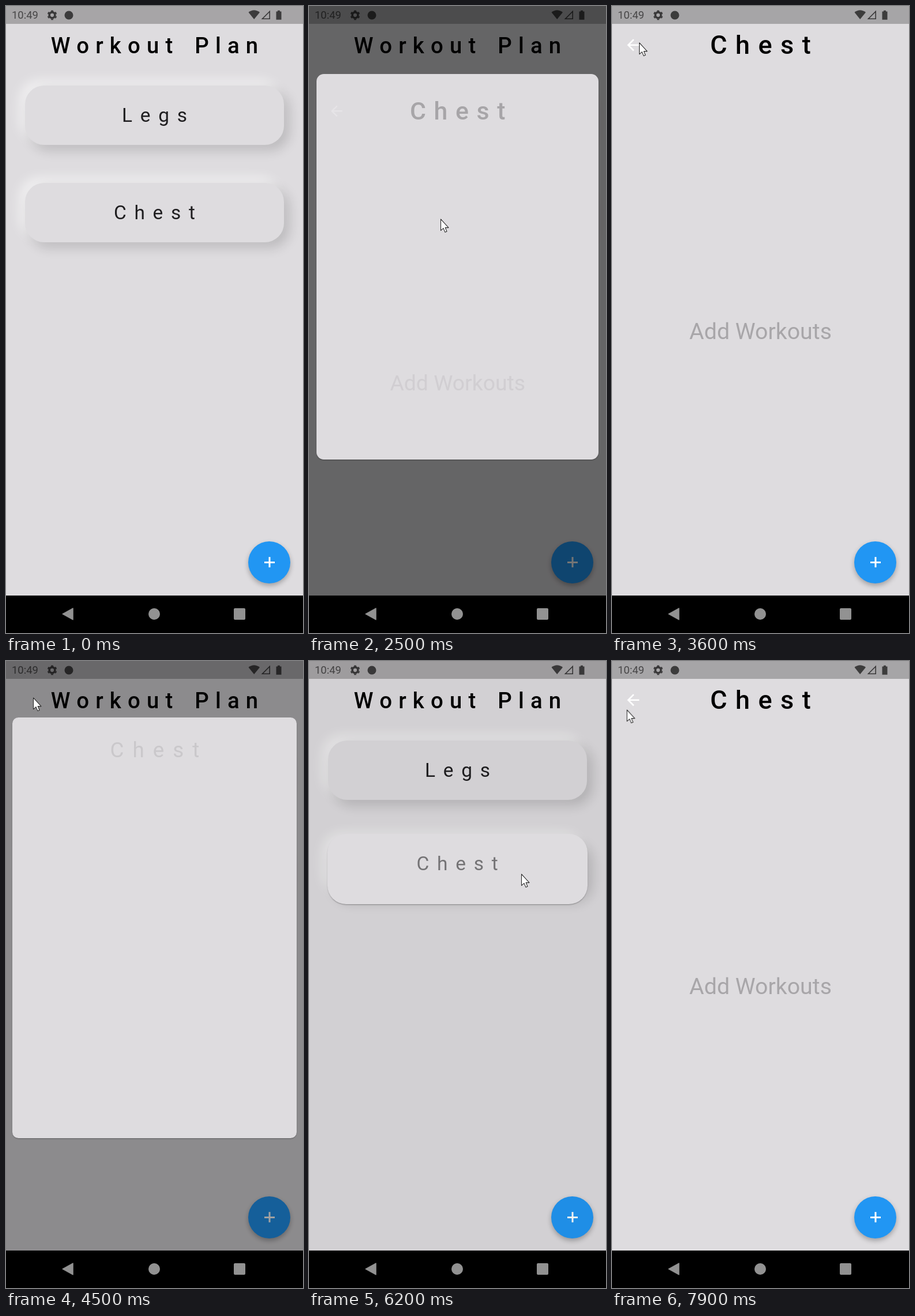
These frames come from a looping animation (515 px wide and 1088 px high, 8000 ms). An HTML page:

```html
<!DOCTYPE html>
<html lang="en">
<head>
<meta charset="utf-8">
<title>Workout Plan</title>
<style>
@property --p { syntax: '<number>'; inherits: true; initial-value: 0; }
@property --rate { syntax: '<number>'; inherits: true; initial-value: 5; }

html, body { margin: 0; width: 100%; height: 100%; overflow: hidden; background: #000; }

#stage {
  --now: 0;
  --bg: #dedcdf;
  position: relative; width: 515px; height: 1088px; overflow: hidden;
  font-family: Roboto, sans-serif; color: #000;
  animation: grow 8s cubic-bezier(.4, 0, .2, 1) infinite, rate 8s step-end infinite;
}
#stage, #stage * {
  animation-play-state: paused;
  animation-delay: calc(var(--now) * -1ms);
}
#stage div, #stage svg { position: absolute; }

.screen { left: 0; top: 0; width: 515px; height: 1024px; background: var(--bg); }

/* Zero line height: top marks the middle of the line. */
.text {
  left: 0; width: 100%; line-height: 0; text-align: center; white-space: nowrap;
  letter-spacing: var(--gap); text-indent: var(--gap);
}
.title { --gap: 11.2px; top: 68.6px; font-size: 38.3px; font-weight: 500; word-spacing: 6px; }
.heading { --gap: 14.4px; top: 68.4px; font-size: 45px; font-weight: 500; }
.label { --gap: 13.7px; top: 52.3px; font-size: 33.4px; color: #1f1e20; }
.hint { --gap: 0px; top: 564.6px; font-size: 39.3px; color: #a8a6a9; }

.card {
  left: 33px; width: 449px; height: 103px; border-radius: 33px; background: var(--bg);
  box-shadow: 9px 9px 20px 1px rgba(0, 0, 0, .15), -9px -9px 20px 1px rgba(255, 255, 255, .55);
}

.fab {
  left: 420.1px; top: 928.9px; width: 73.4px; height: 73.4px; border-radius: 50%;
  background: #2196f3; box-shadow: 0 4px 8px rgba(0, 0, 0, .28);
}
.fab::before, .fab::after {
  content: ''; position: absolute; background: #fff;
  left: 27.5px; top: 35.4px; width: 18.4px; height: 2.6px;
}
.fab::after { transform: rotate(90deg); }

.scrim {
  left: 0; top: 0; width: 515px; height: 1024px; background: #000;
  opacity: calc(.541 * min(1, var(--p) * var(--rate)));
}

.panel {
  --w: calc(449 + 66 * var(--p));
  left: calc(33px * (1 - var(--p)));
  top: calc(306.5px * (1 - var(--p)));
  width: calc(1px * var(--w));
  height: calc(103px + 921px * var(--p));
  border-radius: calc(33px * (1 - var(--p)));
  background: var(--bg); overflow: hidden;
  box-shadow: 0 1.5px 2px -.5px rgba(0, 0, 0, .32);
  animation: show 8s step-end infinite;
}
.panel > div { left: 0; top: 0; transform-origin: 0 0; }
.closed {
  width: 449px; height: 103px; transform: scale(calc(var(--w) / 449));
  animation: closed 8s linear infinite;
}
.open {
  width: 515px; height: 1024px; transform: scale(calc(var(--w) / 515));
  animation: open 8s linear infinite;
}
.back { left: 20.8px; top: 52.2px; }

.status { left: 0; top: 0; width: 515px; height: 30.5px; background: rgba(0, 0, 0, .25); }
.nav { left: 0; top: 1023px; width: 515px; height: 65px; background: #000; }
.cursor {
  left: 0; top: 0; overflow: visible;
  animation: point 8s ease-in-out infinite, appear 8s step-end infinite;
}

@keyframes grow {
  0%, 27.25% { --p: 0; }
  37.25%, 53.425% { --p: 1; }
  63.425%, 76.6% { --p: 0; }
  86.6%, 100% { --p: 1; }
}
/* The scrim darkens fast on the way in and clears evenly on the way out. */
@keyframes rate {
  0% { --rate: 5; }
  53.425% { --rate: 1; }
  63.425%, 100% { --rate: 5; }
}
@keyframes show {
  0% { opacity: 0; }
  27.25% { opacity: 1; }
  63.425% { opacity: 0; }
  76.6%, 100% { opacity: 1; }
}
@keyframes closed {
  0%, 27.25% { opacity: 1; }
  29.25%, 55.425% { opacity: 0; }
  63.425%, 76.6% { opacity: 1; }
  78.6%, 100% { opacity: 0; }
}
@keyframes open {
  0%, 29.25% { opacity: 0; }
  37.25%, 53.425% { opacity: 1; }
  55.425%, 78.6% { opacity: 0; }
  86.6%, 100% { opacity: 1; }
}
@keyframes point {
  0%, 37.5% { transform: translate(228px, 369px); }
  45%, 62.5% { transform: translate(47px, 63px); }
  68.75%, 70% { transform: translate(439px, 484px); }
  75%, 87.5% { transform: translate(368px, 369px); }
  93.75%, 95% { transform: translate(225px, 223px); }
  98.75%, 100% { transform: translate(25.5px, 84px); }
}
@keyframes appear {
  0% { opacity: 0; }
  27.5%, 100% { opacity: 1; }
}
</style>
</head>
<body>
<div id="stage">
  <div class="screen">
    <div class="text title">Workout Plan</div>
    <div class="card" style="top:137.5px"><div class="text label">Legs</div></div>
    <div class="card" style="top:306.5px"><div class="text label">Chest</div></div>
    <div class="fab"></div>
  </div>

  <div class="scrim"></div>

  <div class="panel">
    <div class="closed"><div class="text label">Chest</div></div>
    <div class="open">
      <svg class="back" width="31.4" height="31.4" viewBox="0 0 24 24">
        <path fill="#fff" d="M20 11H7.83l5.59-5.59L12 4l-8 8 8 8 1.41-1.41L7.83 13H20z"/>
      </svg>
      <div class="text heading">Chest</div>
      <div class="text hint">Add Workouts</div>
      <div class="fab"></div>
    </div>
  </div>

  <div class="status">
    <svg width="515" height="30" fill="#000" fill-opacity=".64">
      <text x="10" y="22.3" font-size="18.4" fill-opacity=".58">10:49</text>
      <g fill="none" stroke="#000" stroke-opacity=".66">
        <circle cx="80" cy="15.8" r="4.9" stroke-width="3.6"/>
        <circle cx="80" cy="15.8" r="7.5" stroke-width="1.8" pathLength="12" stroke-dasharray="1" stroke-dashoffset="-.5"/>
        <path d="M444.5 22.2H457.2V9.5Z" stroke-width="1.6"/>
      </g>
      <circle cx="109" cy="16" r="7.5"/>
      <path d="M420.5 11Q430 3.5 440 11L430.2 23Z"/>
      <path d="M468.5 9.5h2.5v-1.8h4v1.8h2.5v14.3h-9z"/>
    </svg>
  </div>

  <div class="nav">
    <svg width="515" height="65" fill="#929292">
      <path d="M97.8 32L116.2 21.8V42.2Z" stroke="#929292" stroke-linejoin="round"/>
      <circle cx="257" cy="32" r="10"/>
      <rect x="395" y="22" width="20" height="20" rx="2"/>
    </svg>
  </div>

  <svg class="cursor" width="16" height="26">
    <path d="M.5.8V20.6L5 16.6 8 23.6 11 22.3 8.2 15.6H14Z" fill="#fff" stroke="#2b2b2b" stroke-width="1.1" stroke-linejoin="round"/>
  </svg>
</div>

<script>
const LOOP = 8000, TICK = 100, LEAD = 40;
const stage = document.getElementById('stage');
const start = performance.now();

// The screen refreshes ten times a second; keyframes follow this clock.
function frame() {
  const time = performance.now() - start + LEAD;
  stage.style.setProperty('--now', Math.floor(time / TICK) * TICK % LOOP);
  requestAnimationFrame(frame);
}
frame();
</script>
</body>
</html>
```
